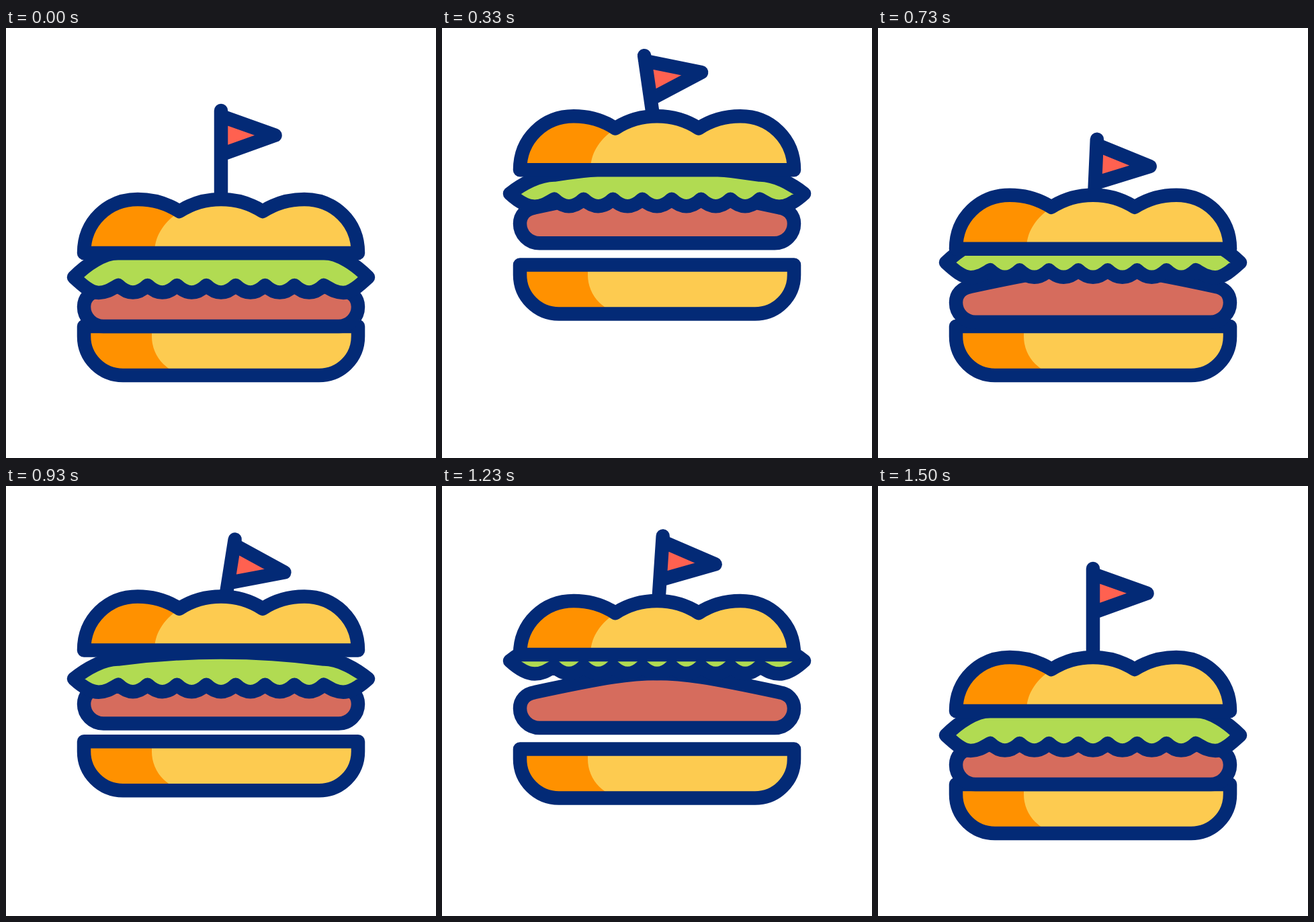
These frames come from a looping animation (640x640 px, 2 s). An HTML page:

```html
<!DOCTYPE html>
<html lang="en">
<head>
<meta charset="utf-8">
<title>Hopping burger</title>
<style>
  html, body { margin: 0; height: 100%; overflow: hidden; background: #fff; }
  svg { display: block; width: 100vw; height: 100vh; }
  .line { stroke: #032a76; stroke-width: 20.5; stroke-linecap: round; stroke-linejoin: round; }
</style>
</head>
<body>
<svg viewBox="0 0 640 640">
  <defs>
    <path id="baseShape" d="M116 444H524V459A58 58 0 0 1 466 517H174A58 58 0 0 1 116 459Z"/>
    <path id="topShape" d="M116 335C116 288 152 255 196 255C219 255 241 262 258 273C275 262 297 255 320 255S365 262 382 273C399 262 421 255 444 255C488 255 524 288 524 335Z"/>
  </defs>
  <path id="flag" class="line" fill="#ff6150" d="M320 123V255M320 131L400.5 159.7L320 188.5"/>
  <g id="base">
    <use href="#baseShape" fill="#fdcb50"/>
    <path fill="#ff9100" d="M116 444H217V459A58 58 0 0 0 275 517H174A58 58 0 0 1 116 459Z"/>
    <use href="#baseShape" class="line" fill="none"/>
  </g>
  <path id="patty" class="line" fill="#d66c5d" d="M145 444A29 29 0 0 1 116 415C116 402 125 393 138 391C245 368 280 363 320 363S395 368 502 391C515 393 524 402 524 415A29 29 0 0 1 495 444Z"/>
  <path id="lettuce" class="line" fill="#b1db52"/>
  <g id="top">
    <use href="#topShape" fill="#fdcb50"/>
    <path fill="#ff9100" d="M116 335C116 288 152 255 196 255C219 255 241 262 258 273C234 290 221 310 221 335Z"/>
    <use href="#topShape" class="line" fill="none"/>
  </g>
</svg>
<script>
const FPS = 30, LOOP = 2000;
const [flag, base, patty, lettuce, topBun] =
  ['flag', 'base', 'patty', 'lettuce', 'top'].map(id => document.getElementById(id));

// Eased step from 0 to 1.
function ramp(f, from, to) {
  const u = Math.min(1, Math.max(0, (f - from) / (to - from)));
  return u * u * (3 - 2 * u);
}

// Two hops; the second may hang in the air between peak and fall.
const hop = (f, height, peak, land, peak2, fall, land2) =>
  -height * (ramp(f, 0, peak) - ramp(f, peak, land) + ramp(f, land, peak2) - ramp(f, fall, land2));

// The flag overshoots downwards between its hops.
const flagShift = f => -93.5 * ramp(f, 0, 12.6) + 138.5 * ramp(f, 12.6, 22.8)
  - 153 * ramp(f, 22.8, 32.1) + 108 * ramp(f, 32.1, 41.3);

const flagTilt = f => -9.5 * ramp(f, 0, 13) + 18.6 * ramp(f, 14.5, 27) - 9.1 * ramp(f, 27, 45);

// bend: 0 lying flat, 1 fully arched in the air.
function lettucePath(y, bend) {
  const tip = 371 + y, shoulder = 335 + y + 8 * bend, wave = 383 + y - 3.8 * bend;
  const low = wave + 11, slope = tip - (tip - shoulder) * 0.53, lobe = 306 / 7;
  return `M101 ${tip}C120 ${slope} 145 ${shoulder} 167 ${shoulder}`
    + `Q320 ${shoulder - 24 * bend} 473 ${shoulder}C495 ${shoulder} 520 ${slope} 539 ${tip}`
    + `C526 ${tip + 12} 514 ${low} 502 ${low}S482 ${wave + 5} 473 ${wave}`
    + `q${-lobe / 2} 21 ${-lobe} 0`.repeat(7)
    + `C158 ${wave + 5} 150 ${low} 138 ${low}S114 ${tip + 12} 101 ${tip}Z`;
}

const shift = (el, y) => el.setAttribute('transform', `translate(0 ${y})`);

function draw(ms) {
  const f = Math.floor((ms % LOOP + 3.4) * FPS / 1000);
  const baseY = hop(f, 102, 12.5, 22.1, 32.2, 32.2, 42);
  const topY = hop(f, 138, 12.5, 23.4, 31, 32.3, 43.3);
  const leafY = hop(f, 145, 13.1, 24.9, 30.5, 33.3, 45);
  const bend = Math.min(1, Math.max(0, (baseY - topY) / 32));
  shift(base, baseY);
  shift(patty, topY);
  shift(topBun, topY);
  lettuce.setAttribute('d', lettucePath(leafY, bend));
  flag.setAttribute('transform', `translate(0 ${flagShift(f)}) rotate(${flagTilt(f)} 320 255)`);
}

const start = performance.now();
function tick() {
  draw(performance.now() - start);
  requestAnimationFrame(tick);
}
tick();
</script>
</body>
</html>
```
